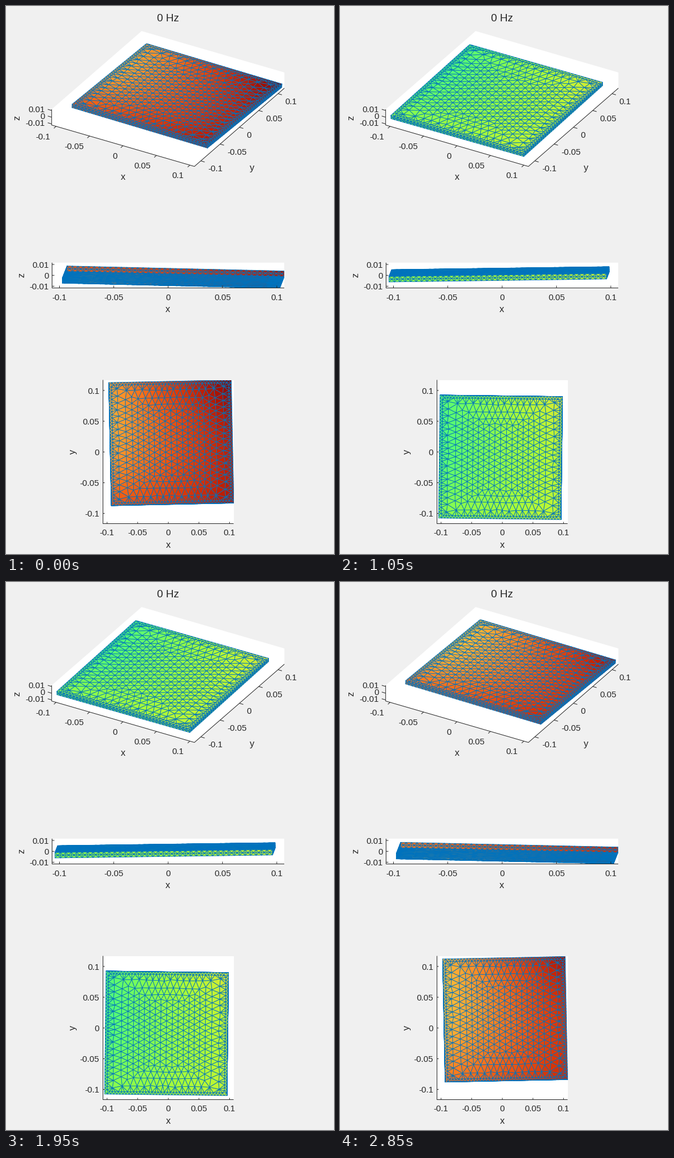
Write a matplotlib script that moves like this. It is 580 px wide and 965 px high and loops after 3 s.

```python
import math

import numpy as np
import matplotlib.pyplot as plt
from matplotlib.animation import FuncAnimation
from matplotlib.collections import PolyCollection
from matplotlib.patches import Polygon
from matplotlib.tri import Triangulation

W, H, DPI = 580, 965, 80
PX = 72 / DPI                       # points per pixel
FRAMES, INTERVAL = 20, 150
INK, EDGE, BACK = "#262626", "#0072bd", "#f0f0f0"

HALF, THICK = 0.1, 0.0025           # half width and half thickness of the plate
LIM = np.array([0.1067, 0.1165, 0.0117])

# Rigid mode: translation plus linearised rotation
SHIFT = np.array([0.00485, 0.0148, -0.0016])
RX, RY, RZ = -0.054, 0.023, 0.0212
SPIN = np.array([[0, -RZ, RY], [RZ, 0, -RX], [-RY, RX, 0]])


def plate_mesh():
    """Triangles of the square: fine rim, then columns with a wedge of rows
    at the top and bottom."""
    rim, step = 0.0108, 0.01
    rings = [(0, 0.005, 0), (0.0045, 0.005, 0.5)]
    rings += [(rim + j * 0.0088, step, 0.5 * (j % 2)) for j in range(11)]
    pts = np.empty((0, 2))
    for depth, h, offset in rings:
        side = HALF - depth
        inner = depth > rim
        tall = HALF - max(rim, depth / 2) if inner else side
        wide = HALF - 2 * depth if inner else side
        for a in (np.arange(-41, 42) + offset) * h:
            spots = []
            if abs(a) <= tall + 1e-9:
                spots += [(-side, a), (side, a)]
            if abs(a) <= wide + 1e-9:
                spots += [(a, side), (a, -side)]
            for p in spots:
                gap = np.hypot(*(pts - p).T).min() if len(pts) else 1
                if gap > 0.68 * h:
                    pts = np.vstack([pts, p])
    free = np.abs(pts).max(axis=1) < HALF - 0.012
    for _ in range(3):
        total, count = np.zeros_like(pts), np.zeros(len(pts))
        for a, b in Triangulation(*pts.T).edges:
            total[a] += pts[b]
            total[b] += pts[a]
            count[[a, b]] += 1
        pts[free] = (total / count[:, None])[free]
    return pts[Triangulation(*pts.T).triangles]


def strip_mesh():
    """Triangles of one narrow side: crossed squares with a middle line."""
    tris = []
    for a in np.linspace(-HALF, HALF, 41)[:-1]:
        b = a + 2 * THICK
        ring = [(a, -THICK), (b, -THICK), (b, 0),
                (b, THICK), (a, THICK), (a, 0)]
        mid = (a + THICK, 0)
        tris += [(ring[i], ring[(i + 1) % 6], mid) for i in range(6)]
    return np.array(tris)


def make_face(tris, axis, value):
    """Lift flat triangles into the plane where one coordinate is fixed."""
    out = np.insert(tris, axis, value, axis=2)
    return out, np.sign(value) * np.eye(3)[axis]


plate, strip = plate_mesh(), strip_mesh()
faces = [make_face(plate, 2, s * THICK) for s in (-1, 1)]
faces += [make_face(strip, axis, s * HALF) for axis in (0, 1) for s in (-1, 1)]


def move(p):
    return SHIFT + p @ SPIN.T


corners = np.array([(x, y, z) for x in (-HALF, HALF) for y in (-HALF, HALF)
                    for z in (-THICK, THICK)])
PEAK = np.linalg.norm(move(corners), axis=1).max()
turbo = plt.get_cmap("turbo")

fig = plt.figure(figsize=(W / DPI, H / DPI), dpi=DPI, facecolor=BACK)
ax = fig.add_axes([0, 0, 1, 1])
ax.set_xlim(0, W)
ax.set_ylim(H, 0)
ax.axis("off")


def text(x, y, s, size=15, ha="center", rot=0):
    """Text whose digits are centred on y."""
    if rot:
        ax.text(x, y, s, size=size * PX, family="Liberation Sans", color=INK,
                ha="center", va="center", rotation=rot)
    else:
        ax.text(x, y + 0.35 * size, s, size=size * PX, color=INK, ha=ha,
                family="Liberation Sans", va="baseline")


def axis_name(x, y, s, rot=0):
    text(x, y if rot else y - 1.5, s, 16.5, rot=rot)


def line(*pts):
    ax.plot(*zip(*pts), color=INK, lw=PX, zorder=5, snap=False,
            solid_capstyle="butt")


class View:
    def __init__(self, cx, cy, scale, az, el):
        a, e = math.radians(az), math.radians(el)
        self.center, self.scale = np.array([cx, cy]), scale
        right = np.array([math.cos(a), math.sin(a), 0])
        up = np.array([-math.sin(e) * math.sin(a),
                       math.sin(e) * math.cos(a), math.cos(e)])
        self.basis = np.array([right, -up]).T
        self.eye = np.cross(right, up)

    def project(self, p):
        return self.center + self.scale * (np.asarray(p) @ self.basis)

    def panel(self, outline):
        patch = Polygon(outline, closed=True, fc="white", ec="none", zorder=1)
        ax.add_patch(patch)
        self.mesh = PolyCollection([], edgecolors=EDGE, linewidths=0.85 * PX,
                                   joinstyle="round", zorder=3)
        ax.add_collection(self.mesh, autolim=False)
        self.mesh.set_clip_path(patch)

    def update(self, c):
        turn = np.linalg.inv(np.eye(3) + c * SPIN).T
        polys, values = [], []
        for tris, normal in faces:
            if (turn @ normal) @ self.eye > 1e-9:
                polys.append(self.project(tris + c * move(tris)))
                size = np.linalg.norm(move(tris.mean(axis=1)), axis=1)
                values.append(abs(c) * size / PEAK)
        self.mesh.set_verts(np.concatenate(polys))
        self.mesh.set_facecolor(turbo(np.concatenate(values)))


def box(x0, y0, x1, y1):
    return [(x0, y0), (x1, y0), (x1, y1), (x0, y1)]


TICKS = [(-0.1, "-0.1"), (-0.05, "-0.05"), (0, "0"), (0.05, "0.05"), (0.1, "0.1")]
Z_TICKS = [(-0.01, "-0.01"), (0, "0"), (0.01, "0.01")]
LX, LY, LZ = LIM
TICK = 0.0058

text(286.5, 20, "0 Hz", 19)

# Oblique view
oblique = View(286.5, 163.3, 1366, 30, 30)
hull = [(-LX, -LY, -LZ), (LX, -LY, -LZ), (LX, LY, -LZ),
        (LX, LY, LZ), (-LX, LY, LZ), (-LX, -LY, LZ)]
outline = oblique.project(hull)
oblique.panel(outline)
line(outline[5], *outline[:3])
for v, s in TICKS:
    p, q = oblique.project([(v, -LY, -LZ), (v, -LY - TICK, -LZ)])
    line(p, q)
    text(p[0] - 10.5, p[1] + 17.5, s, ha="right")
    p, q = oblique.project([(LX, v, -LZ), (LX + TICK, v, -LZ)])
    line(p, q)
    text(p[0] + 12.5, p[1] + 13.5, s, ha="left")
for v, s in Z_TICKS:
    p, q = oblique.project([(-LX, -LY, v), (-LX - TICK, -LY, v)])
    line(p, q)
    text(68.5, p[1] - 2, s, ha="right")
axis_name(207, 302, "x")
axis_name(435, 286, "y")
axis_name(20, 197, "z", 90)

# Front view
front = View(286.7, 474.3, 1922, 0, 0)
front.panel(box(81.5, 452, 492, 496.5))
line((81.5, 452), (81.5, 496.5), (492, 496.5))
for v, s in TICKS:
    x = front.project((v, 0, 0))[0]
    line((x, 496.5), (x, 492.5))
    text(x, 513, s)
for v, s in Z_TICKS:
    y = front.project((0, 0, v))[1]
    line((81.5, y), (85.5, y))
    text(75.5, y + 0.5, s, ha="right")
axis_name(286, 534.5, "x")
axis_name(28, 474, "z", 90)

# Top view
top = View(287, 785.3, 1083, 0, 90)
top.panel(box(171.5, 658.5, 402.5, 911.5))
line((171.5, 658.5), (171.5, 911.5), (402.5, 911.5))
for v, s in TICKS:
    x, y = top.project((v, v, 0))
    line((x, 911.5), (x, 908.5))
    line((171.5, y), (174.5, y))
    text(x, 927, s)
    text(165, y + 0.5, s, ha="right")
axis_name(287, 949.5, "x")
axis_name(119, 785, "y", 90)

views = [oblique, front, top]


def draw(i):
    c = math.cos(2 * math.pi * i / FRAMES)
    for view in views:
        view.update(c)
    return [view.mesh for view in views]


anim = FuncAnimation(fig, draw, frames=FRAMES, interval=INTERVAL,
                     repeat=True, repeat_delay=0)
plt.show()
```
